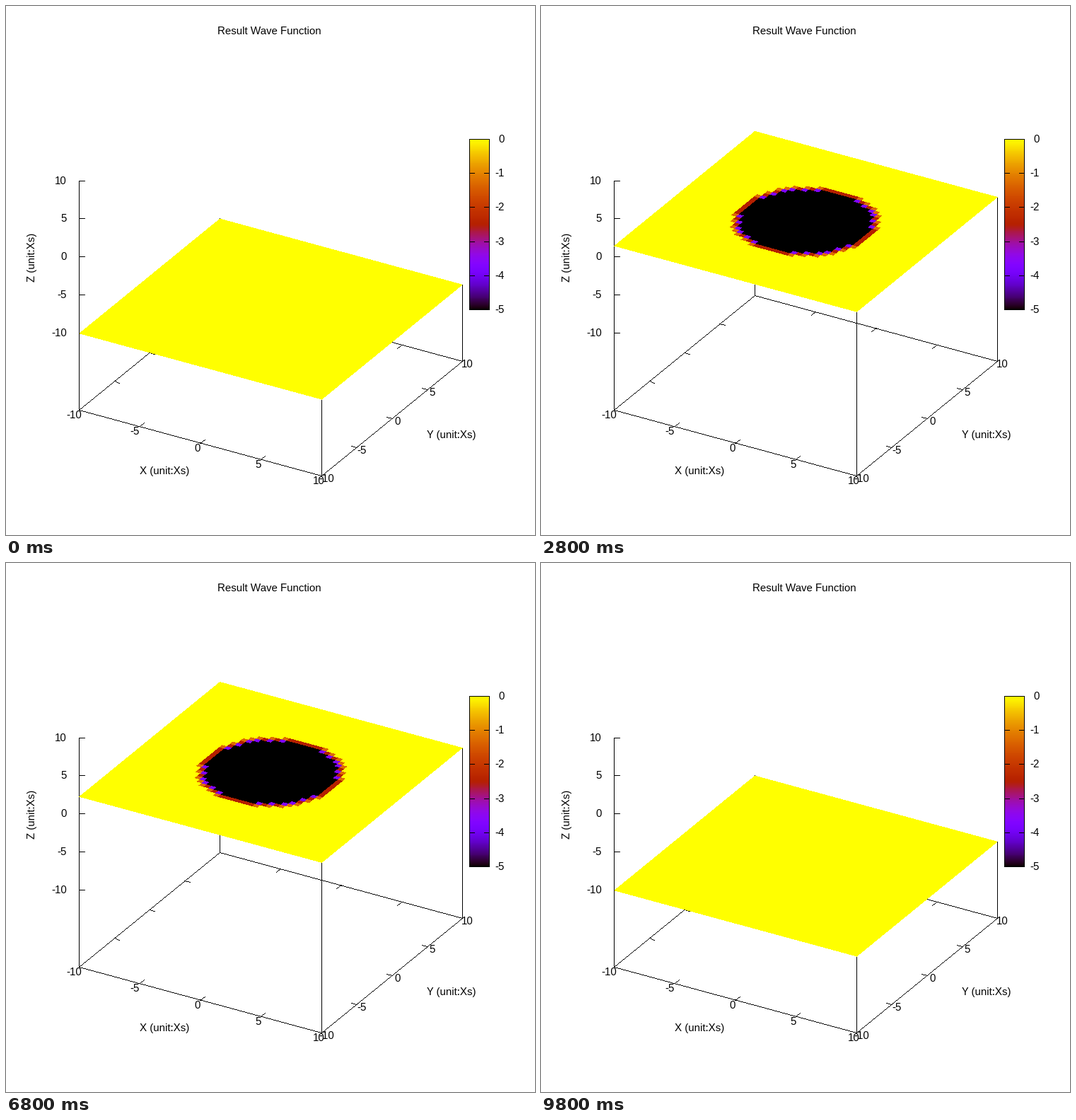
Recreate the animation shown at these times as a matplotlib script. Size 748 by 748 pixels, loop 9900 ms.

```python
import numpy as np
import matplotlib.pyplot as plt
from matplotlib.animation import FuncAnimation

SIZE = 748
DPI = 72
FRAMES = 99
TOP = 49                 # frame at which the slice is highest
RISE = 4.42              # pixels per frame
BASE = np.array([103.0, 571.0])      # floor corner at x = y = -10
U = np.array([343.0, 93.2])          # full x axis on screen
V = np.array([199.0, -162.3])        # full y axis on screen
SLICE_Y = 462.6          # left corner of the lowest slice
POINTS = 50
RADIUS = 5.0
DEPTH = -5.0
EDGE = 0.001             # keeps border pixels of the slice

plt.rcParams["font.family"] = "Liberation Sans"
plt.rcParams["text.hinting"] = "native"
fig = plt.figure(figsize=(SIZE / DPI, SIZE / DPI), dpi=DPI, facecolor="white")
ax = fig.add_axes([0, 0, 1, 1])
ax.axis("off")


def palette(value):
    """Black, violet, red, yellow ramp over DEPTH..0, as 8-bit RGB."""
    g = np.clip(1 - np.asarray(value) / DEPTH, 0, 1)
    blue = np.clip(np.sin(2 * np.pi * g), 0, 1)
    rgb = np.stack([np.sqrt(g), g ** 3, blue], axis=-1)
    return np.round(rgb * 255).astype(np.uint8)


def floor(x, y):
    return BASE + U * (x + 10) / 20 + V * (y + 10) / 20


def line(canvas, start, end):
    """Draw a black line one pixel wide, without smoothing."""
    start, end = np.round(start), np.round(end)
    count = int(np.abs(end - start).max()) + 1
    x, y = np.round(np.linspace(start, end, count)).astype(int).T
    canvas[y, x] = 0


def label(x, y, text, ha="center"):
    """Place text with its capitals centred on y."""
    ax.text(x, y + 5.4, text, size=15, ha=ha, va="baseline", color="black")


def draw_axes(canvas):
    corners = [floor(-10, -10), floor(10, -10), floor(10, 10), floor(-10, 10)]
    for i in range(4):
        line(canvas, corners[i], corners[(i + 1) % 4])
    line(canvas, (103, 247), (103, 571))

    du = U / np.hypot(*U) * 8
    dv = V / np.hypot(*V) * 8
    for t in (-10, -5, 0, 5, 10):
        front, right = floor(t, -10), floor(10, t)
        if abs(t) < 10:
            back, left = floor(t, 10), floor(-10, t)
            line(canvas, front, front + dv)
            line(canvas, back, back - dv)
            line(canvas, right, right - du)
            line(canvas, left, left + du)
        shift = -6.4 if t < 0 else -4
        label(front[0] + shift, front[1] + 6.7, str(t))
        label(right[0] + 7.7, right[1] + 3.6, str(t))

        y = round(354.2 - 10.76 * t)
        line(canvas, (103, y), (111, y))
        label(86, y, str(t), ha="right")

    label(372.5, 35, "Result Wave Function")
    label(224, 657, "X (unit:Xs)")
    label(630, 606, "Y (unit:Xs)")
    ax.text(37, 355.5, "Z (unit:Xs)", size=15, rotation=90,
            ha="center", va="center")


def draw_colorbar(canvas):
    x0, x1, y0, y1 = 655, 683, 188, 429
    steps = 128
    rows = np.arange(y1 - y0) * steps // (y1 - y0)
    ramp = palette(DEPTH * rows / (steps - 1))
    canvas[y0:y1, x0:x1] = ramp[:, None]
    for x in (x0, x1):
        line(canvas, (x, y0), (x, y1))
    for y in (y0, y1):
        line(canvas, (x0, y), (x1, y))
    for k in range(6):
        y = round(y0 + (y1 - y0) * k / 5)
        label(705, y, str(-k), ha="right")
        line(canvas, (x0, y), (x0 + 7, y))
        line(canvas, (x1 - 7, y), (x1, y))


def cell_values(level):
    """Mean of the four corner values of each cell in one slice."""
    axis = np.linspace(-10, 10, POINTS)
    xx, yy = np.meshgrid(axis, axis)
    inside = (xx ** 2 + yy ** 2 <= RADIUS ** 2) & (0 < level < TOP)
    f = np.where(inside, DEPTH, 0.0)
    return (f[:-1, :-1] + f[1:, :-1] + f[1:, 1:] + f[:-1, 1:]) / 4


def draw_slice(canvas, level):
    """Colour every pixel that falls on the slice by its cell."""
    start = INVERSE @ [BASE[0], SLICE_Y - RISE * level]
    a = PIXEL_A - start[0]
    b = PIXEL_B - start[1]
    on = (np.abs(a - 0.5) <= 0.5 + EDGE) & (np.abs(b - 0.5) <= 0.5 + EDGE)
    cells = POINTS - 1
    col = np.clip(a[on] * cells, 0, cells - 1).astype(int)
    row = np.clip(b[on] * cells, 0, cells - 1).astype(int)
    canvas[on] = palette(cell_values(level))[row, col]


# Screen pixels expressed in units of the two slice axes
INVERSE = np.linalg.inv(np.column_stack([U, V]))
PIXEL_Y, PIXEL_X = np.mgrid[0:SIZE, 0:SIZE]
PIXEL_A = INVERSE[0, 0] * PIXEL_X + INVERSE[0, 1] * PIXEL_Y
PIXEL_B = INVERSE[1, 0] * PIXEL_X + INVERSE[1, 1] * PIXEL_Y

backdrop = np.full((SIZE, SIZE, 3), 255, np.uint8)
draw_axes(backdrop)
draw_colorbar(backdrop)
view = ax.imshow(backdrop, extent=(0, SIZE, SIZE, 0), aspect="auto",
                 interpolation="nearest")
ax.set_xlim(0, SIZE)
ax.set_ylim(SIZE, 0)


def update(frame):
    level = TOP - abs(frame - TOP)
    canvas = backdrop.copy()
    drop = np.array([0, BASE[1] - SLICE_Y + RISE * level])
    for foot in (floor(10, -10), floor(10, 10), floor(-10, 10)):
        line(canvas, foot, foot - drop)
    draw_slice(canvas, level)
    view.set_data(canvas)
    return (view,)


anim = FuncAnimation(fig, update, frames=FRAMES, interval=100,
                     repeat=True, repeat_delay=0, blit=False)
plt.show()
```
